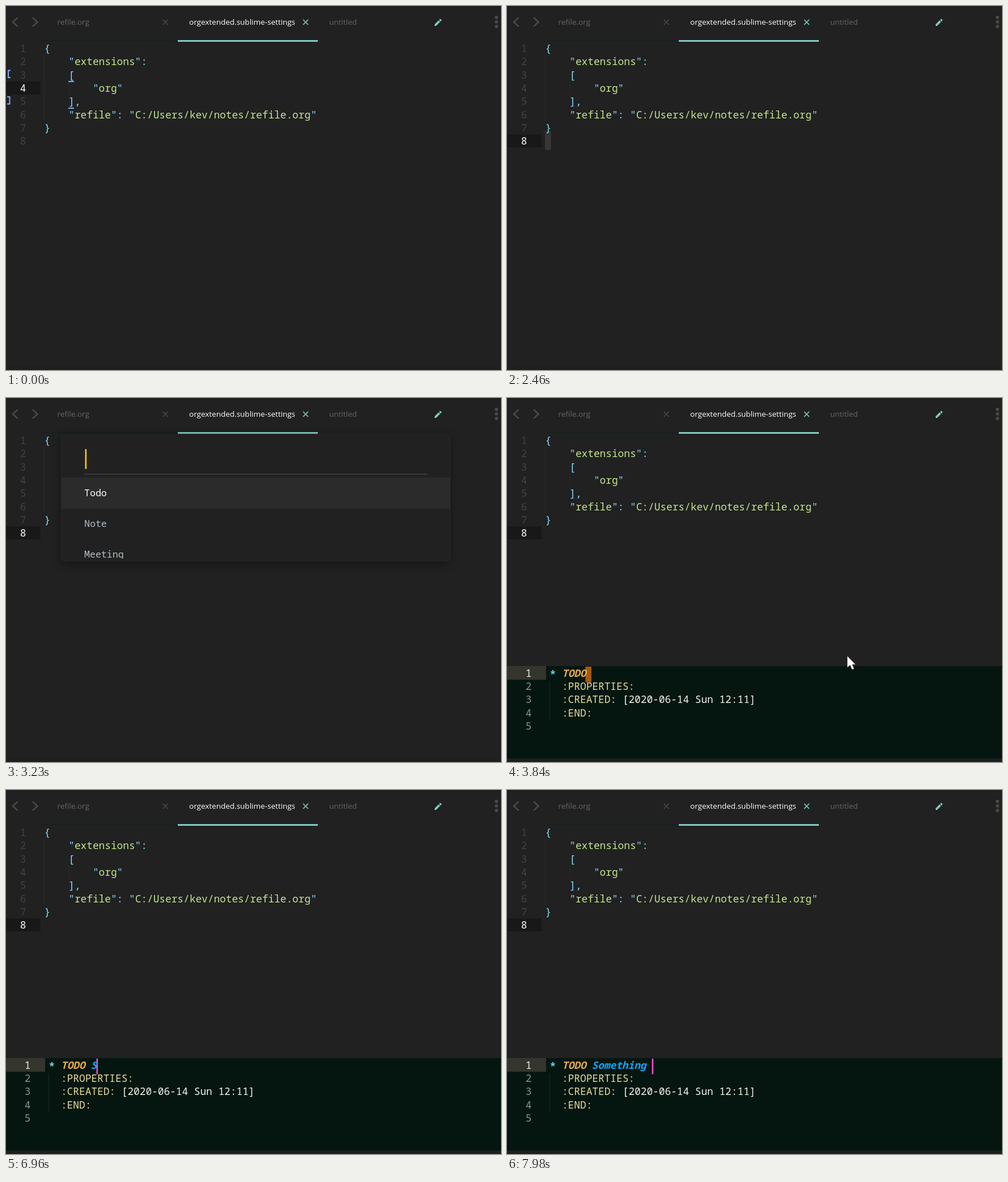
These frames come from a looping animation (873 px wide and 641 px high, 8 s). An HTML page:

```html
<!DOCTYPE html>
<html lang="en">
<head>
<meta charset="utf-8">
<style>
  html, body { margin: 0; width: 100%; height: 100%; overflow: hidden; background: #212121; }
  svg { display: block; }
  text { font: 500 17.8px "Noto Sans Mono", monospace; white-space: pre; }
  .ui text { font: 13.5px "Open Sans", sans-serif; fill: #666; }
  .num { text-anchor: middle; font-weight: 400; fill: #424242; }
  .num.on { fill: #fff; }
  .str { fill: #c3e88d; }
  .pun { fill: #89ddff; }
  .key { fill: #e6db9a; }
  .date { fill: #f4f4ee; }
  .head { font-weight: bold; font-style: italic; }
  #capture .num { fill: #8b938d; }
  #capture .num:first-child { fill: #f0f0ea; }
  #popup text { font-size: 16.6px; font-weight: 400; fill: #b0bec5; }
  .line { fill: none; }
</style>
</head>
<body>
<svg width="873" height="641" viewBox="0 0 873 641">
  <rect width="873" height="641" fill="#212121"/>
  <rect y="635" width="873" height="6" fill="#1f1f1f"/>

  <g class="ui">
    <path class="line" d="M20.5 20.5L12 28.3L20.5 36M47 20.5L55.5 28.3L47 36" stroke="#484848" stroke-width="2.6"/>
    <rect x="68" y="60" width="235" height="2.5" fill="#19211f"/>
    <rect x="303" y="60" width="247" height="3" fill="#80cbc4"/>
    <text x="90.5" y="33">refile.org</text>
    <text x="323" y="33" style="fill:#fff">orgextended.sublime-settings</text>
    <text x="570" y="33">untitled</text>
    <path d="M276.5 24l9 9m0-9l-9 9" stroke="#4c4c4c" stroke-width="1.3"/>
    <path d="M524 24l9 9m0-9l-9 9" stroke="#80cbc4" stroke-width="1.6"/>
    <path d="M756 35v-2.8l7-7 2.7 2.7-7 7zM763.8 24.4l1.4-1.3q.7-.5 1.4 0l1.3 1.4q.5.7 0 1.4l-1.3 1.3z" fill="#80cbc4"/>
    <g fill="#484848"><circle cx="865" cy="20" r="3"/><circle cx="865" cy="28" r="3"/><circle cx="865" cy="36" r="3"/></g>
  </g>

  <rect id="row" width="61" height="23" fill="#181818"/>
  <path d="M67.5 87V203M110.5 133V156" stroke="#343434" stroke-dasharray="1 1"/>
  <rect id="block" x="67" y="220" width="10.5" height="33.5" fill="#373737"/>
  <g id="code"></g>
  <path id="brackets" class="line" d="M8 113.5H4V126H8M2 160H6.5V172.5H2M110 133h10M110 180h10" stroke="#82aaff" stroke-width="2"/>

  <g id="popup">
    <rect x="97.5" y="64" width="686" height="223" rx="4" fill="#212121" stroke="#292929" style="filter:drop-shadow(0 4px 8px rgba(0,0,0,.4))"/>
    <rect x="97" y="140" width="687" height="55" fill="#2b2b2b"/>
    <rect x="139.5" y="90" width="2.6" height="35" fill="#ffcc00"/>
    <rect x="138" y="133.5" width="605" height="1.2" fill="#4c4c4c"/>
    <text x="138" y="173" style="fill:#fff">Todo</text>
    <text x="138" y="227">Note</text>
    <clipPath id="list"><rect x="97" y="140" width="687" height="143"/></clipPath>
    <g clip-path="url(#list)"><text x="138" y="281">Meeting</text></g>
  </g>

  <g id="panel">
    <rect y="472" width="873" height="163" fill="#051610"/>
    <rect y="472" width="69" height="24" fill="#34352d"/>
    <path d="M75.5 500V566" stroke="#3c4a43" stroke-dasharray="1 1.5"/>
    <rect id="caret" y="473" height="27.5"/>
    <g id="capture"></g>
    <text x="75.6" y="493" style="font-weight:bold" fill="#66d9ef">*</text>
    <text class="head" x="97" y="491" fill="#e8ab4c">TODO</text>
    <text class="head" id="title" x="149.5" y="491" fill="#16a5f5"></text>
  </g>

  <path id="beam" class="line" d="M-5-10H-2Q0-10 0-8Q0-10 2-10H5M0-8V8M-5 10H-2Q0 10 0 8Q0 10 2 10H5" stroke="#dedede" stroke-width="1.4"/>
  <path id="arrow" d="M600 454V475L605 470.5L608.5 478.5L612.3 476.8L609 469.5H615Z" fill="#fff" stroke="#111" stroke-width=".6"/>
</svg>
<script>
const $ = id => document.getElementById(id);
const PITCH = 23.3, CHAR = 10.68;

// Each line is a list of [column, class, text].
const code = [
  [[0, 'pun', '{']],
  [[4, 'pun', '"          ":'], [5, 'str', 'extensions']],
  [[4, 'pun', '[']],
  [[8, 'pun', '"   "'], [9, 'str', 'org']],
  [[4, 'pun', '],']],
  [[4, 'pun', '"      ": "'], [5, 'str', 'refile'], [15, 'str', 'C:/Users/kev/notes/refile.org'], [44, 'pun', '"']],
  [[0, 'pun', '}']],
  []
];
const capture = [
  [],
  [[2, 'key', ':PROPERTIES:']],
  [[2, 'key', ':CREATED:'], [12, 'date', '[2020-06-14 Sun 12:11]']],
  [[2, 'key', ':END:']],
  []
];

function lines(group, rows, x, y, numX) {
  $(group).innerHTML = rows.map((parts, i) => {
    const base = Math.round(y + i * PITCH);
    return `<text class="num" x="${numX}" y="${base}">${i + 1}</text>` + parts.map(([col, cls, s]) =>
      `<text class="${cls}" x="${x + col * CHAR}" y="${base}">${s}</text>`).join('');
  }).join('');
}
lines('code', code, 67.5, 81, 30);
lines('capture', capture, 75.6, 490.6, 38);
const numbers = document.querySelectorAll('#code .num');

const pointer = [[990, 659.5, 504], [1070, 641.5, 478], [1300, 620, 464], [1380, 605, 456], [1450, 601.5, 455]];
const title = 'Something ';
const keyTimes = [6960, 7110, 7195, 7280, 7510, 7590, 7670, 7750, 7830, 7980];
const CLICK = 1530, POPUP = 2690, PANEL = 3840, FOCUS = 5400;

const show = (id, on) => $(id).style.display = on ? '' : 'none';
const set = (id, attrs) => { for (const k in attrs) $(id).setAttribute(k, attrs[k]); };

function draw() {
  const t = performance.now() % 8000;
  const row = t < CLICK ? 3 : 7;
  set('row', { y: Math.round(63 + row * PITCH) });
  numbers.forEach((n, i) => n.classList.toggle('on', i === row));
  show('brackets', t < CLICK);
  show('block', t >= CLICK && t < POPUP);
  show('popup', t >= POPUP && t < PANEL);
  show('panel', t >= PANEL);
  show('arrow', t >= PANEL && t < FOCUS);

  const spot = pointer.filter(p => p[0] <= t).pop();
  show('beam', spot && t < 2460);
  if (spot) set('beam', { transform: `translate(${spot[1]} ${spot[2]})` });

  const typed = keyTimes.filter(k => k <= t).length;
  $('title').textContent = title.slice(0, typed);
  set('caret', t < FOCUS
    ? { x: 138.3, width: 10.5, fill: '#a55a10' }
    : { x: 148.8 + typed * CHAR, width: 2.5, fill: '#f551dc' });
  requestAnimationFrame(draw);
}
draw();
</script>
</body>
</html>
```
